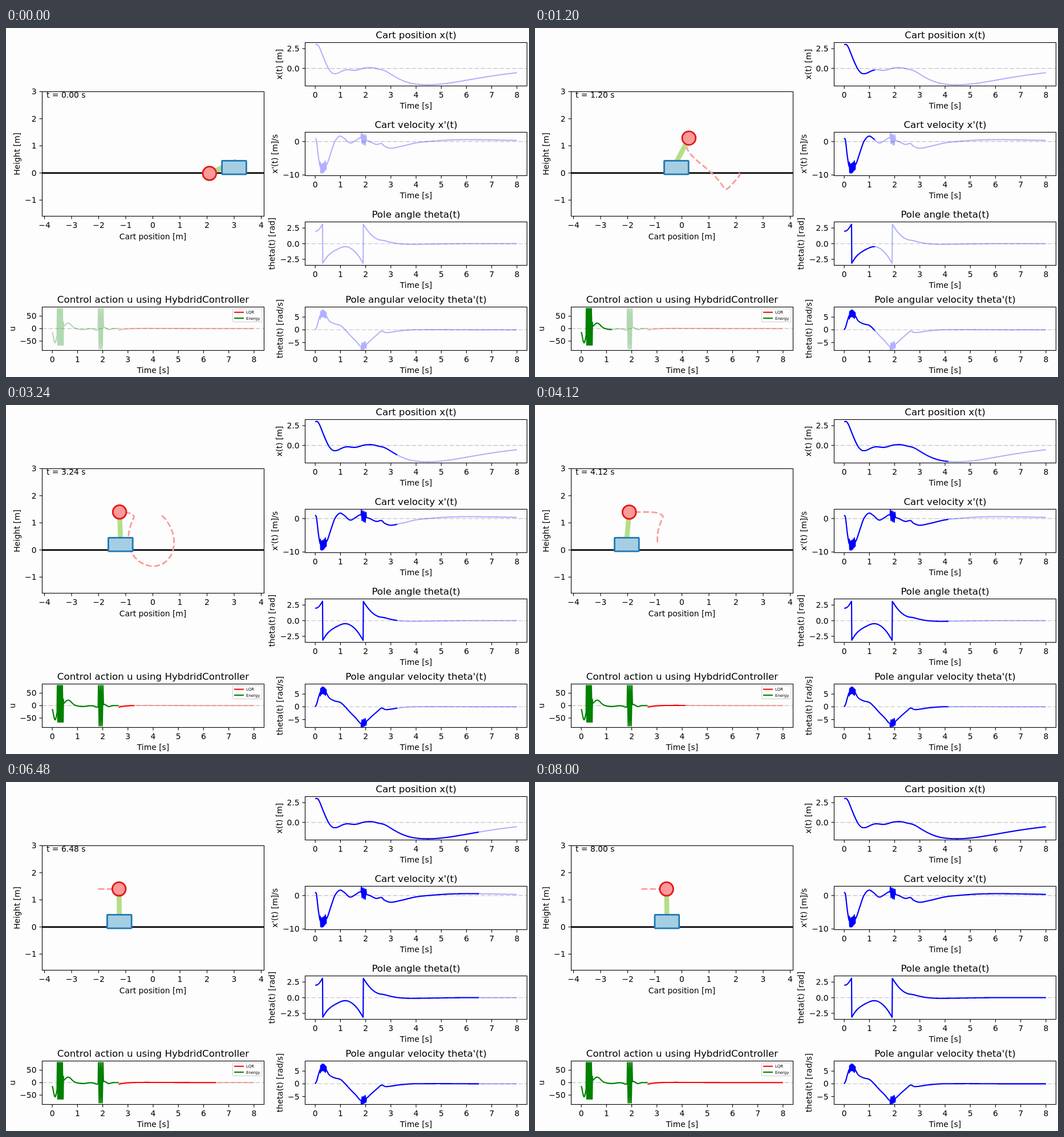
An HTML page that plays this animation: 917 by 611 pixels, repeating every 8040 ms.

```html
<!DOCTYPE html>
<html lang="en">
<head>
<meta charset="utf-8">
<title>Cart and pole</title>
<style>
  html, body { margin: 0; width: 100%; height: 100%; overflow: hidden; background: #fdfdfd; }
  svg { display: block; width: 917px; height: 611px; }
  text { font: 13.9px "DejaVu Sans", sans-serif; white-space: pre; }
  .title { font-size: 16.7px; }
  .key { font-size: 6.95px; }
</style>
</head>
<body>
<svg id="stage" viewBox="0 0 917 611"></svg>
<script>
const STEP = 40, FRAMES = 201, TRAIL = 49, DT = 0.01, END = 8, SWITCH = 2.63;
const stage = document.getElementById('stage');

function set(node, attrs) {
  for (const key in attrs) node.setAttribute(key, attrs[key]);
}
function add(tag, attrs, parent = stage) {
  const node = document.createElementNS('http://www.w3.org/2000/svg', tag);
  set(node, attrs);
  return parent.appendChild(node);
}
function label(str, x, y, anchor = 'middle', cls = '') {
  const node = add('text', { x, y, 'text-anchor': anchor, class: cls });
  node.textContent = str;
  return node;
}
function sideLabel(str, x, y) {
  set(label(str, 0, 0), { transform: `translate(${x} ${y}) rotate(-90)` });
}
function line(x1, y1, x2, y2, stroke, width, extra = {}) {
  return add('line', { x1, y1, x2, y2, stroke, 'stroke-width': width, ...extra });
}

// Smooth curve through [t, value] key points
function curve(keys) {
  const last = keys.length - 1;
  const slope = i => {
    const [t0, v0] = keys[Math.max(i - 1, 0)], [t1, v1] = keys[Math.min(i + 1, last)];
    return (v1 - v0) / (t1 - t0);
  };
  return t => {
    let i = 0;
    while (i < last - 1 && t > keys[i + 1][0]) i++;
    const [t0, v0] = keys[i], [t1, v1] = keys[i + 1];
    const h = t1 - t0, s = (t - t0) / h, r = 1 - s;
    return r * r * (1 + 2 * s) * v0 + s * s * (3 - 2 * s) * v1
      + h * s * r * (r * slope(i) - s * slope(i + 1));
  };
}

// Running integral of a rate
function integrate(rate, start) {
  const sums = [start];
  for (let k = 1; k <= END / DT; k++) sums.push(sums[k - 1] + rate((k - .5) * DT) * DT);
  return t => sums[Math.round(t / DT)];
}

// Mean velocities; position and angle follow from them
const meanSpeed = curve([
  [0, 1], [.05, .3], [.12, -4.2], [.2, -7.7], [.3, -8.1], [.4, -7.3], [.48, -6.5], [.64, -2.9],
  [.78, 0], [.97, 1.6], [1.15, .95], [1.38, -.45], [1.6, .3], [1.78, 1.1], [1.95, .5],
  [2.15, .05], [2.42, -.85], [2.63, -.6], [2.75, -1.4], [2.99, -2], [3.4, -1.45], [4, -.4],
  [4.5, .02], [5.3, .45], [6.2, .56], [8, .35]]);
const meanSpin = curve([
  [0, 0], [.06, 1.2], [.13, 3.7], [.2, 5.7], [.3, 6.6], [.43, 5.6], [.55, 3.6], [.75, 2.4],
  [1, 1.7], [1.18, .1], [1.38, -2.1], [1.6, -4.3], [1.81, -6.5], [2, -5.9], [2.27, -3.5],
  [2.5, -1.5], [2.63, -.5], [2.8, -1.1], [3.35, -.4], [3.85, 0], [4.3, .05], [5, .07],
  [6.2, .01], [8, 0]]);
const position = integrate(meanSpeed, 3);
const turn = integrate(meanSpin, 2);
const angle = t => turn(t) > Math.PI ? turn(t) - 2 * Math.PI : turn(t);

// Rapid switching of the controller while the pole swings through the bottom
const bursts = [{ from: .2, to: .44, period: .05 }, { from: 1.83, to: 2.03, period: .06 }];
function chatter(t) {
  const b = bursts.find(({ from, to }) => t >= from && t <= to);
  return b ? Math.cos(2 * Math.PI * (t - b.from) / b.period) : 0;
}
const speed = t => meanSpeed(t) + chatter(t) * 1.5;
const spin = t => meanSpin(t) - chatter(t) * 1.4;

const bump = (t, mid, width, height) => height * Math.exp(-(((t - mid) / width) ** 2) / 2);
const force = t => chatter(t) ? 81 * chatter(t)
  : bump(t, .11, .065, -57) + bump(t, .63, .13, 22) + bump(t, 1.2, .15, -4)
  + bump(t, 1.77, .09, -6) + bump(t, 2.07, .05, 5) + bump(t, 2.25, .06, -4);
const balance = t => 3 * Math.exp(-.8 * (t - SWITCH)) - 9.5 * Math.exp(-3 * (t - SWITCH));

const progress = [];

function frame([l, t, w, h], xs, ys, x, y) {
  const b = t + h;
  add('rect', { x: l, y: t, width: w, height: h, fill: 'none', stroke: '#000', 'stroke-width': 1.1 });
  const name = v => String(v).replace('-', '\u2212');
  for (const v of xs) {
    line(x(v), b, x(v), b + 5, '#000', 1.1);
    label(name(v), x(v), b + 20.5);
  }
  for (const v of ys) {
    line(l - 5, y(v), l, y(v), '#000', 1.1);
    label(name(v), l - 10, Math.round(y(v) + 5), 'end');
  }
}

function plot({ left = 524.5, top, zero, unit, ticks, title, side, sideX, series }) {
  const w = 389, h = 76, mid = left + w / 2;
  const x = v => left + (v + .4) * w / 8.8, y = v => zero - v * unit;
  const id = 'past' + progress.length;
  const clip = add('clipPath', { id });
  const rect = add('rect', { x: left, y: top, width: 0, height: h }, clip);
  progress.push(time => set(rect, { width: time ? x(time) - left + .5 : 0 }));

  line(left, zero, left + w, zero, '#808080', 1.4, { 'stroke-dasharray': '7.7 3.3', opacity: .4 });
  const paths = series.map(({ fn, color, from = 0, to = END }) => {
    const points = [];
    for (let k = Math.round(from / DT); k <= Math.round(to / DT); k++) {
      points.push(x(k * DT).toFixed(2) + ',' + y(fn(k * DT)).toFixed(2));
    }
    return { points: points.join(' '), fill: 'none', stroke: color, 'stroke-width': 2.08, 'stroke-linejoin': 'round' };
  });
  for (const p of paths) add('polyline', { ...p, opacity: .3 });
  for (const p of paths) add('polyline', { ...p, 'clip-path': `url(#${id})` });

  frame([left, top, w, h], [...Array(9).keys()], ticks, x, y);
  label(title, mid, top - 7.5, 'middle', 'title');
  label('Time [s]', mid, top + h + 39.5);
  sideLabel(side, sideX, top + h / 2);
}

const blue = fn => [{ fn, color: '#0000ff' }];
plot({ top: 25.5, zero: 70.7, unit: 13.8, ticks: ['2.5', '0.0'],
  title: 'Cart position x(t)', side: 'x(t) [m]', sideX: 484, series: blue(position) });
plot({ top: 182.5, zero: 198.8, unit: 5.85, ticks: [0, -10],
  title: "Cart velocity x'(t)", side: "x'(t) [m]/s", sideX: 476, series: blue(speed) });
plot({ top: 339.5, zero: 377.6, unit: 10.94, ticks: ['2.5', '0.0', '-2.5'],
  title: 'Pole angle theta(t)', side: 'theta(t) [rad]', sideX: 471, series: blue(angle) });
plot({ top: 488.5, zero: 528.4, unit: 4.45, ticks: [5, 0, -5],
  title: "Pole angular velocity theta'(t)", side: 'theta(t) [rad/s]', sideX: 485, series: blue(spin) });
plot({ left: 63.5, top: 488.5, zero: 526.3, unit: .436, ticks: [50, 0, -50],
  title: 'Control action u using HybdridController', side: 'u', sideX: 16,
  series: [{ fn: force, color: '#008000', to: SWITCH }, { fn: balance, color: '#ff0000', from: SWITCH }] });

add('rect', { x: 397.5, y: 491.5, width: 51.5, height: 23, rx: 1.4, fill: '#fff', 'fill-opacity': .8, stroke: '#ccc' });
[['LQR', '#ff0000'], ['Energy', '#008000']].forEach(([name, color], i) => {
  const y = 497.7 + i * 10.3;
  line(400, y, 417, y, color, 2.08);
  label(name, 421, y + 2.5, 'start', 'key');
});

// Scene
const SCALE = 47.5, PIVOT = .4;
const sx = v => 257.5 + v * SCALE, sy = v => 253.8 - v * SCALE;
line(63, sy(0), 452, sy(0), '#000', 2.8);
const trail = add('polyline', { fill: 'none', stroke: '#fb9a99', 'stroke-width': 2.78, 'stroke-dasharray': '10.3 4.45', 'stroke-linejoin': 'round' });
const pole = line(0, 0, 0, 0, '#b2df8a', 8.6, { 'stroke-linecap': 'square' });
const cart = add('rect', { y: sy(.45), width: .9 * SCALE, height: .5 * SCALE, rx: 1, fill: '#a6cee3', stroke: '#1f78b4', 'stroke-width': 2.78, 'stroke-linejoin': 'round' });
const bob = add('circle', { r: .25 * SCALE, fill: '#fb9a99', stroke: '#e31a1c', 'stroke-width': 2.78 });
frame([63.5, 111.5, 389, 218], [-4, -3, -2, -1, 0, 1, 2, 3, 4], [3, 2, 1, 0, -1], sx, sy);
label('Cart position [m]', 257.5, 370);
sideLabel('Height [m]', 24, 220.5);
const clock = label('', 71, 122, 'start');

const tip = t => [sx(position(t) - Math.sin(turn(t))), sy(PIVOT + Math.cos(turn(t)))];

function draw(now) {
  const n = Math.floor(now / STEP) % FRAMES, t = n * STEP / 1000;
  const x = position(t), [bx, by] = tip(t);
  for (const update of progress) update(t);
  const points = [];
  for (let k = Math.max(0, n - TRAIL); k <= n; k++) {
    points.push(tip(k * STEP / 1000).map(v => v.toFixed(2)).join());
  }
  set(trail, { points: points.join(' ') });
  set(pole, { x1: sx(x), y1: sy(PIVOT), x2: bx, y2: by });
  set(cart, { x: sx(x - .45) });
  set(bob, { cx: bx, cy: by });
  clock.textContent = `t = ${t.toFixed(2)} s`;
}

const start = performance.now();
function tick() {
  draw(performance.now() - start);
  requestAnimationFrame(tick);
}
tick();
</script>
</body>
</html>
```
